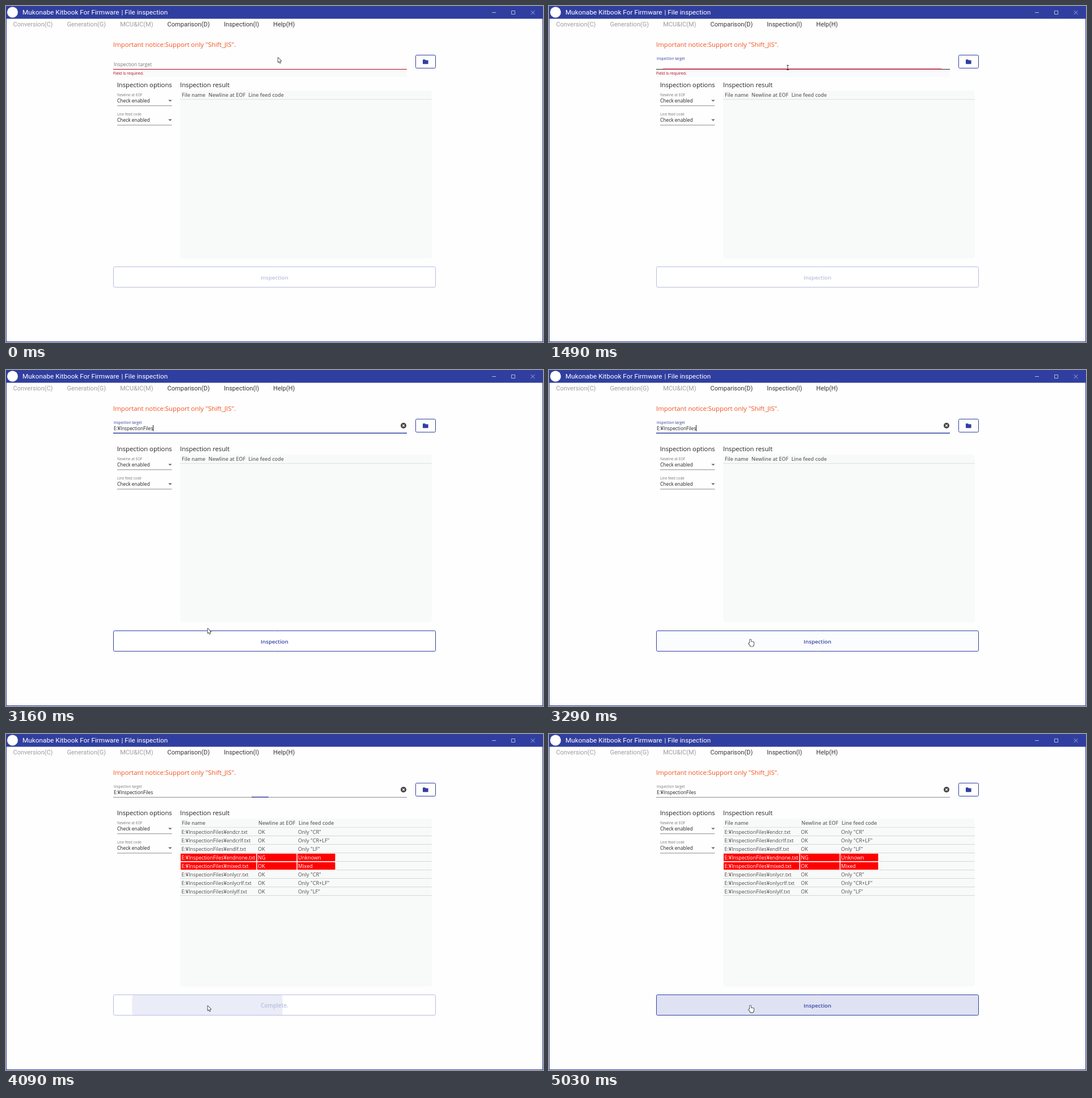
Animation, 947 px wide and 592 px high, one loop 5230 ms. Source, as an HTML page with a canvas:

```html
<!DOCTYPE html>
<html lang="en">
<head>
<meta charset="utf-8">
<title>File inspection</title>
<style>
html, body { margin: 0; width: 100%; height: 100%; overflow: hidden; background: #fff; }
canvas { display: block; width: 947px; height: 592px; }
</style>
</head>
<body>
<canvas id="stage"></canvas>
<script>
const W = 947, H = 592, LOOP = 5230, STEP = 67;
const canvas = document.getElementById('stage');
const ctx = canvas.getContext('2d');
const dpr = window.devicePixelRatio || 1;
canvas.width = Math.round(W * dpr);
canvas.height = Math.round(H * dpr);

const SANS = '"Open Sans", "Noto Sans", sans-serif';
const ROBOTO = { font: 'Roboto, sans-serif' };
const BLUE = '#303f9f', RED = '#b00020', DARK = '#222', GRAY = '#777', LINE = '#8c8c8c';

// Key moments in ms
const MOVE = 70, FOCUS = 890, BLINK = 1490, PASTE = 1890, LEAVE = 2480;
const CLICK = 3890, DONE = 4020, SETTLE = 4420, READY = 5030;
const CUES = [0, MOVE, FOCUS, BLINK, PASTE, LEAVE, CLICK, SETTLE, READY];

const ENDINGS = { cr: 'Only "CR"', crlf: 'Only "CR+LF"', lf: 'Only "LF"' };
const listFiles = prefix => Object.entries(ENDINGS).map(([end, feed]) => [prefix + end, 'OK', feed]);
const ROWS = [
  ...listFiles('end'),
  ['endnone', 'NG', 'Unknown', true],
  ['mixed', 'OK', 'Mixed', true],
  ...listFiles('only')
];

const clamp = v => Math.max(0, Math.min(1, v));
const ramp = (t, a, b) => clamp((t - a) / (b - a));
const mix = (a, b, p) => a + (b - a) * p;
const easeOut = (p, power = 3) => 1 - (1 - p) ** power;
const smooth = p => p * p * (3 - 2 * p);
const between = (t, a, b) => t >= a && t < b;

// The screen refreshes in even steps counted from the latest cue
function snap(t) {
  const cue = CUES.filter(c => c <= t).pop();
  return cue + Math.floor((t - cue + 8) / STEP) * STEP;
}

function pointerAt(t) {
  if (t < LEAVE) {
    const p = smooth(ramp(t, 0, 405));
    return [mix(479, 421, p), mix(90, 108, p)];
  }
  const p = easeOut(ramp(t, LEAVE, 3375), 2);
  return [mix(421, 355, easeOut(p)), mix(108, 478, p)];
}

function text(str, x, y, size, color, { font = SANS, weight = 400, align = 'left' } = {}) {
  ctx.font = `${weight} ${size}px ${font}`;
  ctx.textAlign = align;
  ctx.fillStyle = color;
  ctx.fillText(str, x, y);
  return ctx.measureText(str).width;
}

function rect(x, y, w, h, color) {
  ctx.fillStyle = color;
  ctx.fillRect(x, y, w, h);
}

function roundRect(x, y, w, h, r, fill, stroke) {
  ctx.beginPath();
  ctx.roundRect(x, y, w, h, r);
  if (fill) { ctx.fillStyle = fill; ctx.fill(); }
  if (stroke) { ctx.strokeStyle = stroke; ctx.lineWidth = 1; ctx.stroke(); }
}

function circle(x, y, r, color) {
  ctx.beginPath();
  ctx.arc(x, y, r, 0, Math.PI * 2);
  ctx.fillStyle = color;
  ctx.fill();
}

function cross(x, y, r, color, width) {
  ctx.beginPath();
  ctx.moveTo(x - r, y - r); ctx.lineTo(x + r, y + r);
  ctx.moveTo(x + r, y - r); ctx.lineTo(x - r, y + r);
  ctx.strokeStyle = color;
  ctx.lineWidth = width;
  ctx.stroke();
}

function drawWindow() {
  const icon = '#b4bbdf';
  rect(0, 0, W, H, BLUE);
  rect(1, 22.5, W - 2, H - 23.5, '#fefefe');
  circle(11.5, 11, 9.5, '#fff');
  text('Mukonabe Kitbook For Firmware', 29, 15, 11.8, '#fff', ROBOTO);
  text('| File inspection', 203.5, 15, 11.8, '#fff', ROBOTO);
  rect(857, 11, 7, 1, icon);
  roundRect(891.5, 8.5, 6, 6, 0, null, icon);
  cross(929, 11.5, 3.3, icon, 0.9);

  const menu = ['Conversion(C)', 'Generation(G)', 'MCU&IC(M)', 'Comparison(D)', 'Inspection(I)', 'Help(H)'];
  let x = 12.5;
  menu.forEach((label, i) => {
    x += 25 + text(label, x, 35.5, 11.05, i < 3 ? '#a09c9c' : '#3a3636', ROBOTO);
  });
}

function drawSelect(label, y) {
  text(label, 196, y + 2.5, 6.3, GRAY);
  text('Check enabled', 196, y + 14, 8.45, DARK);
  rect(196, y + 19, 96.5, 1, LINE);
  ctx.beginPath();
  ctx.moveTo(286.2, y + 9.2);
  ctx.lineTo(292.6, y + 9.2);
  ctx.lineTo(289.4, y + 12.4);
  ctx.fillStyle = '#666';
  ctx.fill();
}

function drawFolderButton() {
  roundRect(722.5, 86.5, 35, 23, 2, '#fff', BLUE);
  roundRect(735, 94.2, 4.6, 4, 0.8, BLUE);
  roundRect(735, 95.4, 9.6, 6.8, 0.8, BLUE);
}

function drawField(t) {
  const filled = t >= PASTE;
  const focused = between(t, FOCUS, CLICK);
  const rise = easeOut(ramp(t, FOCUS - 40, FOCUS + 200));
  text('Inspection target', 190, mix(106, 94.8, rise), mix(8.5, 6.3, rise), focused ? BLUE : GRAY);

  if (filled) {
    text('E:¥InspectionFiles', 190, 106, 8.35, DARK);
    circle(701, 98, 5, '#484444');
    cross(701, 98, 1.9, '#fff', 1.2);
  } else {
    rect(189, 113, 518, 12, '#f9fbfa');
    text('Field is required.', 189, 121.4, 7, RED);
  }

  const base = t < FOCUS ? RED : filled ? LINE : DARK;
  rect(189, 111, 518, 1, base);
  if (focused) {
    const s = filled ? 1 : 0.948 * easeOut(ramp(t, FOCUS - 60, 1220));
    rect(421 - 232 * s, 110.5, 518 * s, 1.5, filled ? BLUE : RED);
  } else if (between(t, CLICK, CLICK + 300)) {
    const s = 0.71 * Math.exp((CLICK - t) / 80);
    rect(448 - 259 * s, 110.5, 518 * s, 1.5, BLUE);
  }

  if (between(t, FOCUS, BLINK)) rect(190, 98, 1, 10, DARK);
  if (between(t, PASTE, LEAVE) || between(t, 3010, 3480)) rect(259, 97, 1, 11, DARK);
}

function drawResults(done) {
  roundRect(307, 149, 444, 295.5, 4, '#f8faf9');
  const cols = done ? [310, 445, 516] : [310, 357, 427.5];
  ['File name', 'Newline at EOF', 'Line feed code'].forEach((name, i) =>
    text(name, cols[i], 160.3, 8.95, '#6a6868', { weight: 600 }));
  rect(307, 164, 444, 1, '#dfe1e0');
  if (!done) return;

  ROWS.forEach(([file, eof, feed, bad], k) => {
    const y = 165 + 15 * k;
    rect(307, y + 14, 444, 1, '#d6d8d7');
    if (bad) {
      rect(307, y, 275, 15, '#fff');
      rect(308, y + 0.8, 272.5, 13.3, '#f00');
      for (const x of [441.5, 512.5]) rect(x, y, 1.5, 15, '#fff');
    }
    const color = bad ? '#fff' : '#4c4a4a';
    text(`E:¥InspectionFiles¥${file}.txt`, 309.5, y + 10.8, 8.95, color);
    text(eof, 444.3, y + 10.8, 8.95, color);
    text(feed, 515, y + 10.8, 9.15, color);
  });
}

function drawRipple(t, pressed) {
  ctx.save();
  ctx.beginPath();
  ctx.rect(190, 460, 567, 35);
  ctx.clip();
  if (pressed) {
    circle(355, 478, mix(1.5, 3.8, ramp(t, CLICK, CLICK + STEP)), '#b8bfe4');
  } else {
    const fade = 1 - ramp(t, 4100, 4490);
    circle(355, 478, mix(68, 133, ramp(t, DONE, 4090)), `rgba(48,68,180,${0.1 * fade})`);
  }
  ctx.restore();
}

function drawButton(t) {
  const busy = between(t, DONE, READY);
  const enabled = t >= PASTE && !busy;
  const pressed = t >= CLICK && !busy;
  const hover = enabled ? 0.04 * ramp(t, 3160, 3480) : 0;
  const box = [189.5, 459.5, 568, 36, 2];
  roundRect(...box, pressed ? '#dfe2f3' : '#fff');
  if (!pressed) roundRect(...box, `rgba(48,63,159,${hover})`);
  if (between(t, CLICK, READY)) drawRipple(t, pressed);
  roundRect(...box, null, enabled ? BLUE : '#b7bde0');
  text(busy ? 'Complete.' : 'Inspection', 473.5, 481.8, busy ? 9.9 : 9.7,
    enabled ? '#3746a2' : '#b8bfe0', { weight: 600, align: 'center' });
}

// Stroke first, then fill, so that overlapping parts join into one shape
function outline(path) {
  ctx.strokeStyle = '#333';
  ctx.lineWidth = 1.6;
  ctx.lineJoin = 'round';
  ctx.stroke(path);
  ctx.fillStyle = '#fff';
  ctx.fill(path);
}

function drawHand() {
  const hand = new Path2D();
  hand.roundRect(-0.9, 0.3, 2, 8, 1);
  hand.roundRect(-0.9, 4.7, 7, 6.6, 1.8);
  hand.roundRect(-0.2, 8, 5.2, 4.6, 0.6);
  hand.roundRect(-3, 7, 4, 2, 1);
  outline(hand);
}

function drawBeam() {
  rect(-0.5, -4, 1, 9, '#333');
  for (const y of [-4, 4.2]) rect(-2, y, 4, 0.9, '#333');
}

function drawPointer(t) {
  const [x, y] = pointerAt(t);
  ctx.save();
  ctx.translate(x, y);
  if (y > 95 && y < 112) drawBeam();
  else if (y > 460 && !between(t, DONE, READY)) drawHand();
  else outline(new Path2D('M.7 1V9L2.6 7.3 4 10.4 5.1 9.9 3.8 6.9 6.4 6.8Z'));
  ctx.restore();
}

function draw(now) {
  const t = snap(now % LOOP);
  ctx.setTransform(dpr, 0, 0, dpr, 0, 0);
  drawWindow();
  text('Important notice:Support only "Shift_JIS".', 189, 72, 11.35, '#f4511e');
  drawField(t);
  drawFolderButton();
  text('Inspection options', 195.7, 143, 11.25, DARK);
  text('Inspection result', 307, 143, 11.25, DARK);
  ['Newline at EOF', 'Line feed code'].forEach((label, i) => drawSelect(label, 156.2 + 34.2 * i));
  drawResults(t >= DONE);
  drawButton(t);
  drawPointer(t);
}

const start = performance.now();
function loop() {
  draw(performance.now() - start);
  requestAnimationFrame(loop);
}
loop();
</script>
</body>
</html>
```
